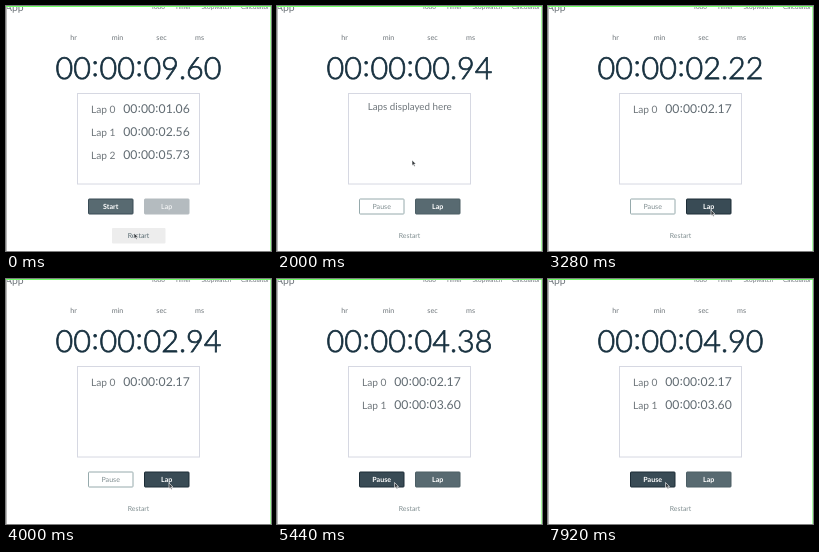
Animation, 265 px wide and 245 px high, one loop 8000 ms. Source, as an HTML page:

```html
<!DOCTYPE html>
<html lang="en">
<head>
<meta charset="utf-8">
<title>Stopwatch</title>
<style>
  html, body { margin: 0; width: 100%; height: 100%; overflow: hidden; background: #fff; }
  svg { display: block; width: 100vw; height: 100vh; }
  text { font-family: Lato, "Open Sans", sans-serif; fill: #70777c; text-rendering: geometricPrecision; }
  .mid text, text.mid { text-anchor: middle; }
  .nav { font-size: 6.4px; }
  .units { font-size: 7.2px; }
  #clock { font-size: 30.5px; font-weight: 300; fill: #17303f; stroke: #17303f; stroke-width: .75; }
  .lap { font-size: 10.2px; }
  .lap .time { font-size: 12.2px; fill: #616b72; }
  #empty { font-size: 9.8px; }
  .buttons { font-size: 7.1px; }
</style>
</head>
<body>
<svg viewBox="0 0 265 245" preserveAspectRatio="none">
  <g class="nav">
    <text x="-1" y="4.500" font-size="10.4">App</text>
    <text x="145" y="3">Todo</text>
    <text x="169" y="3">Timer</text>
    <text x="195.500" y="3">Stopwatch</text>
    <text x="235" y="3">Calculator</text>
  </g>
  <path d="M.5 0V245" stroke="#b9b9b9"/>
  <path d="M264.500 0V245" stroke="#a8ffa2"/>
  <path d="M0 .5H265" stroke="#6bff62"/>

  <g class="units mid">
    <text x="67.500" y="33.700">hr</text>
    <text x="111.500" y="33.700">min</text>
    <text x="155.500" y="33.700">sec</text>
    <text x="193.500" y="33.700">ms</text>
  </g>
  <text id="clock" class="mid" x="132.500" y="72.700"></text>

  <rect x="71.500" y="87.500" width="122" height="90.500" fill="#fff" stroke="#d6d8e2"/>
  <text id="empty" class="mid" x="132.700" y="104.300">Laps displayed here</text>
  <g id="laps"></g>

  <g class="buttons mid">
    <g id="toggle"><rect x="82.500" y="193" width="44.500" height="15" rx=".7"/><text x="104.700" y="203">Start</text></g>
    <g id="lap"><rect x="138.500" y="193" width="44.500" height="15" rx=".7"/><text x="160.700" y="203">Lap</text></g>
    <g id="restart"><rect x="106" y="222" width="53.500" height="15.500" rx="1" fill="#ededed"/><text x="132.500" y="232.300" font-size="6.9">Restart</text></g>
  </g>

  <path id="cursor" d="M0 0V5.600L1.300 4.500 2.200 6.500 3.200 6 2.300 4.100H4Z" fill="#35393d" stroke="#fff" stroke-width=".6"/>
</svg>
<script>
const LOOP = 8000, STEP = 80;
const RESET = 80, START = 1055, PAUSE = 5470, RESUME = 7425;
const PAUSED_AT = 4410;

const WHITE = [255, 255, 255], SLATE = [88, 106, 113], DARK = [57, 75, 85], EDGE = [28, 44, 54];
const MUTED = [180, 187, 191], INK = [128, 142, 145], OUTLINE = [150, 170, 172];

// Keyframes: [time, value]
const restartHover = [[200, 1], [360, 0]];
const toggleHover = [[440, 0], [600, 1], [1110, 1], [1260, 0], [5140, 0], [5300, 1]];
const lapHover = [[2620, 0], [2860, 1], [5000, 1], [5160, 0]];
const lapEnabled = [[START, 0], [1250, 1], [PAUSE, 1], [5720, 0], [RESUME, 0], [7640, 1]];
const cursorX = [[180, 128], [620, 107], [1080, 107], [1270, 135], [2480, 135], [2640, 159],
  [3000, 163], [4900, 163], [5280, 117.5]];
const cursorY = [[180, 227], [620, 201], [1080, 201], [1270, 154], [2480, 154], [2640, 198],
  [3000, 204], [4900, 204], [5280, 203.5]];

const oldLaps = [1060, 2560, 5730];
const newLaps = [[3230, 2170], [4660, 3600]];

const $ = id => document.getElementById(id);
const smooth = p => p * p * (3 - 2 * p);

function track(keys, t) {
  const next = keys.findIndex(key => key[0] > t);
  if (next < 0) return keys[keys.length - 1][1];
  if (next === 0) return keys[0][1];
  const [t0, a] = keys[next - 1], [t1, b] = keys[next];
  return a + (b - a) * smooth((t - t0) / (t1 - t0));
}

const mix = (a, b, p) => a.map((v, i) => v + (b[i] - v) * p);
const css = color => `rgb(${color.map(Math.round).join()})`;

function format(ms) {
  const pad = n => String(Math.floor(n)).padStart(2, "0");
  return `${pad(ms / 3600000)}:${pad(ms / 60000 % 60)}:${pad(ms / 1000 % 60)}.${pad(ms % 1000 / 10)}`;
}

// Colons sit at the middle of the digits, with a little air around them.
function showTime(node, ms) {
  node.innerHTML = format(ms).replace(/:(\d\d)/g,
    '<tspan dx=".02em" dy="-.1em">:</tspan><tspan dx=".02em" dy=".1em">$1</tspan>');
}

function elapsed(t) {
  if (t < RESET) return 9600;
  if (t < START) return 0;
  if (t < PAUSE) return t - START;
  return PAUSED_AT + Math.max(0, t - RESUME);
}

function paint(id, fill, stroke, ink, bold) {
  const [box, label] = $(id).children;
  box.style.fill = css(fill);
  box.style.stroke = css(stroke);
  label.style.fill = css(ink);
  label.style.fontWeight = bold ? 700 : 400;
}

const rows = oldLaps.map((_, i) => {
  const y = 107 + i * 23;
  $("laps").insertAdjacentHTML("beforeend",
    `<g class="lap"><text x="85" y="${y}">Lap ${i}</text><text class="time mid" x="150.500" y="${y + .2}"></text></g>`);
  return $("laps").lastElementChild;
});

function draw(t) {
  const running = t >= START && t < PAUSE || t >= RESUME;
  showTime($("clock"), elapsed(t));

  const laps = t < RESET ? oldLaps : newLaps.filter(([at]) => t >= at).map(([, ms]) => ms);
  $("empty").style.display = laps.length ? "none" : "";
  rows.forEach((row, i) => {
    row.style.display = i < laps.length ? "" : "none";
    if (i < laps.length) showTime(row.lastElementChild, laps[i]);
  });

  const hover = track(toggleHover, t);
  $("toggle").lastElementChild.textContent = running ? "Pause" : "Start";
  paint("toggle", mix(running ? WHITE : SLATE, DARK, hover),
    mix(running ? OUTLINE : DARK, EDGE, hover), mix(running ? INK : WHITE, WHITE, hover),
    !running || hover > .5);

  const enabled = track(lapEnabled, t), lapOver = track(lapHover, t);
  const lapFill = mix(MUTED, mix(SLATE, DARK, lapOver), enabled);
  paint("lap", lapFill, mix(lapFill, EDGE, enabled * (.2 + .8 * lapOver)), WHITE, enabled > .5);

  const restart = track(restartHover, t);
  $("restart").firstElementChild.style.opacity = restart;
  $("restart").lastElementChild.style.fill = css(mix(INK, SLATE, restart));
  $("cursor").setAttribute("transform", `translate(${track(cursorX, t)} ${track(cursorY, t)})`);
}

const origin = performance.now();
function frame() {
  const t = (performance.now() - origin) % LOOP;
  draw(Math.floor(t / STEP) * STEP);
  requestAnimationFrame(frame);
}
frame();
</script>
</body>
</html>
```
